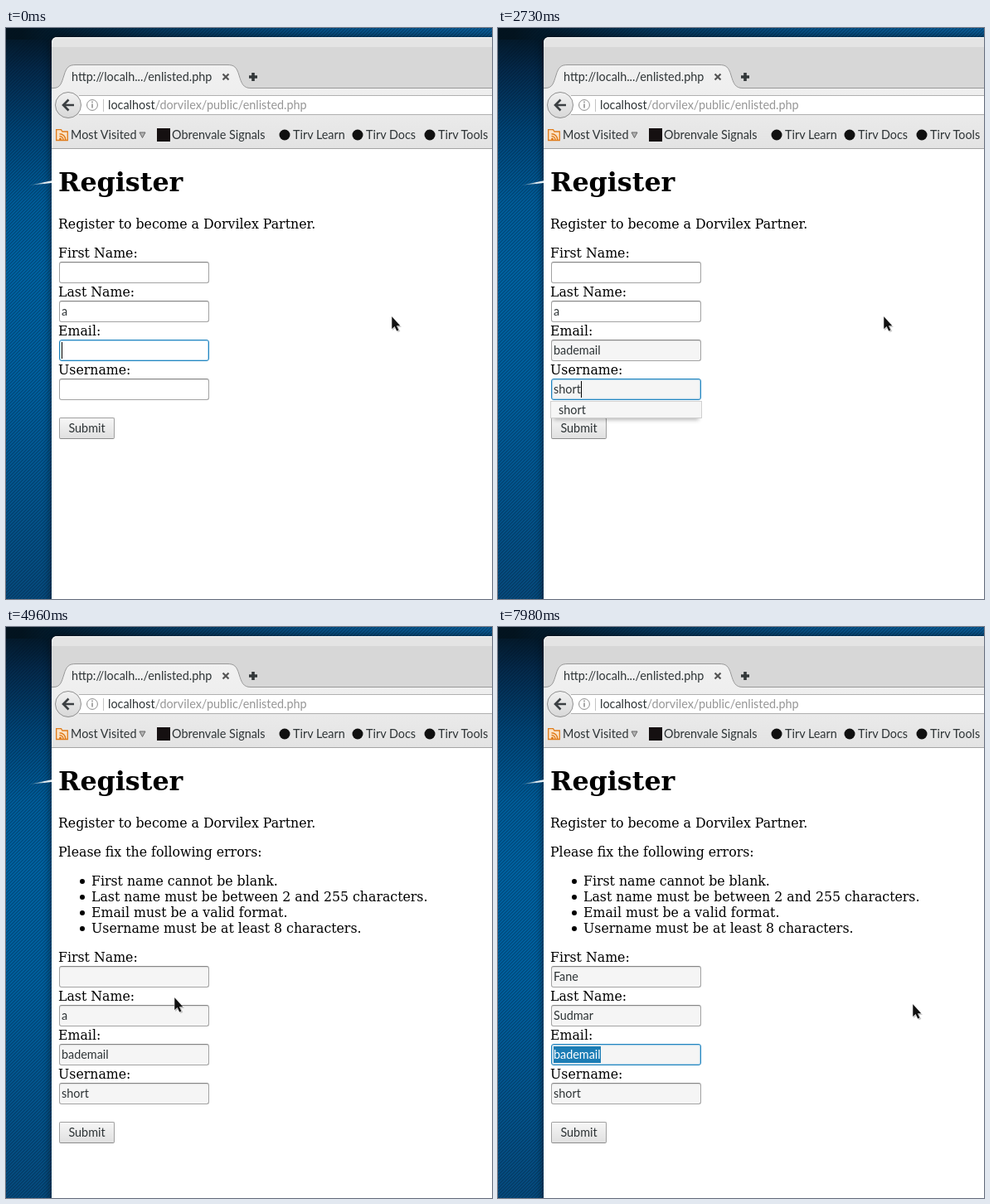
Write an HTML page that moves like this. It is 586 px wide and 689 px high and loops after 8 s.

```html
<!DOCTYPE html>
<html lang="en">
<head>
<meta charset="utf-8">
<title>Register</title>
<style>
  html, body { margin: 0; width: 100%; height: 100%; overflow: hidden; }
  body {
    --weave: repeating-linear-gradient(135deg, rgba(0,12,30,.22) 0 1.4px, transparent 1.4px 2.83px);
    position: relative;
    background: var(--weave),
      linear-gradient(#03141f, #04294a 50px, #004577 125px, #005c98 210px, #0062a1 290px, #005f9d 430px, #03548c 570px, #064a7c 689px);
    font: 15.78px/19px "DejaVu Serif", serif;
    color: #000;
  }
  body > *, #page > *, #form > * { position: absolute; white-space: nowrap; }
  #sky { left: 0; top: 0; width: 586px; height: 14px;
    background: var(--weave), linear-gradient(90deg, #03141f 20px, #063a60 190px, #075389 380px, #0a5c96); }
  #shade { left: 55px; top: 11px; width: 600px; height: 700px; border-radius: 8px 0 0 0; box-shadow: 0 0 9px 1px rgba(0,0,0,.55); }
  #chrome { left: 0; top: 0; }
  #chrome text { font: 14.4px Lato, "Noto Sans", sans-serif; fill: #2e3436; }
  #page { left: 55px; top: 146px; width: 531px; height: 543px; background: #fff; overflow: hidden; }
  h1 { margin: 0; left: 8px; top: 21px; font: bold 31.75px/37px "DejaVu Serif", serif; }
  p { margin: 0; left: 8px; }
  ul { margin: 0; padding: 0; left: 48px; top: 151px; list-style: none; }
  li { position: relative; }
  li::before { content: ""; position: absolute; left: -14px; top: 7px; width: 6px; height: 6px; border-radius: 50%; background: #000; }
  #errors > * { position: absolute; }
  #form { left: 8px; width: 200px; height: 250px; }
  .field, .popup, .submit { box-sizing: border-box; font: 14.4px/20px Lato, "Noto Sans", sans-serif; color: #2e3436; }
  .field { left: 1px; width: 181px; height: 26px; padding: 2px; border: 1px solid #a3a3a3; border-top-color: #858585;
    border-radius: 3px; background: #fff; box-shadow: inset 0 1px 1px rgba(0,0,0,.1); }
  .field.grey { background: #f5f5f5; }
  .field.focus { border-color: #1f84bf; box-shadow: inset 0 0 1px 1px rgba(60,155,212,.4); }
  .field span { display: inline-block; height: 20px; vertical-align: top; }
  .field.picked span { background: #1c7db5; color: #fff; }
  .field i { display: none; width: 1px; height: 20px; margin-right: -1px; background: #000; vertical-align: top; }
  .field.focus i { display: inline-block; }
  .field.picked i { display: none; }
  .popup { left: 0; width: 183px; height: 21px; padding-left: 9px; border: 1px solid #d0d0d0; background: #f6f6f6;
    box-shadow: 0 6px 5px -4px rgba(0,0,0,.28); }
  .submit { left: 1px; top: 208px; width: 67px; height: 26px; border: 1px solid #a0a0a0; border-bottom-color: #8c8c8c;
    border-radius: 2px; background: linear-gradient(#f6f6f6, #e0e0e0); line-height: 24px; text-align: center; }
  #cursor { left: 0; top: 0; overflow: visible; }
</style>
</head>
<body>
<div id="sky"></div>
<div id="shade"></div>

<svg id="chrome" width="586" height="689">
  <defs>
    <linearGradient id="bar" gradientUnits="userSpaceOnUse" x1="0" y1="44" x2="0" y2="145">
      <stop offset="0" stop-color="#f1f1f1"/><stop offset=".4" stop-color="#eeeeee"/><stop offset="1" stop-color="#e3e3e3"/>
    </linearGradient>
    <linearGradient id="knob" x2="0" y2="1"><stop stop-color="#f1f1f1"/><stop offset="1" stop-color="#d8d8d8"/></linearGradient>
    <linearGradient id="ray"><stop stop-color="#8ab" stop-opacity=".15"/><stop offset=".7" stop-color="#e6edf2"/></linearGradient>
  </defs>
  <path d="M27 190L55 184.3V187Z" fill="url(#ray)"/>

  <path d="M55 146V18Q55 11 62 11H586V146Z" fill="#d7d7d7"/>
  <path d="M55 23V18Q55 11 62 11H586V23Z" fill="#e4e4e4"/>
  <path d="M56 18Q56 11.5 62 11.5H586" fill="none" stroke="#f6f6f6"/>
  <path d="M55 72.5H57C66 72.5 67 66 70 57C73 47 76 44.5 84 44.5H267C275 44.5 278 47 281 57C284 67 286 72.5 295 72.5H586V146H55Z" fill="url(#bar)"/>
  <path d="M55 72.5H57C66 72.5 67 66 70 57C73 47 76 44.5 84 44.5H267C275 44.5 278 47 281 57C284 67 286 72.5 295 72.5H586" fill="none" stroke="#989898"/>
  <path d="M55 145.5H586" stroke="#a4a4a4"/>

  <text x="79" y="64">http://localh.../enlisted.php</text>
  <path d="M261.5 55.5l7 7m0-7l-7 7" stroke="#555" stroke-width="2.2"/>
  <path d="M298 54v10m-5-5h10" stroke="#33383a" stroke-width="3.6"/>

  <path d="M88 81.5H586V104.5H88Z" fill="#fff"/>
  <path d="M88 81.5H586M88 104.5H586" stroke="#b0b0b0"/>
  <circle cx="75" cy="93" r="15.5" fill="url(#knob)" stroke="#8f8f8f"/>
  <path d="M82 93H70M75.5 86.5L69 93L75.5 99.5" fill="none" stroke="#3c4043" stroke-width="2.6"/>
  <circle cx="104" cy="93" r="6.4" fill="none" stroke="#8b8b8b"/>
  <path d="M104 91.5v5m0-8v1.8" stroke="#8b8b8b" stroke-width="1.5"/>
  <path d="M117.5 86V101" stroke="#c4c4c4"/>
  <text x="123" y="98">localhost<tspan fill="#969696">/dorvilex/public/enlisted.php</tspan></text>

  <path d="M60.7 135.5V122.7H66.5L68 125H74.3V135.5Z" fill="#fbe3c6" stroke="#e07b1a" stroke-width="1.3"/>
  <circle cx="65.5" cy="134" r="1.5" fill="#e07b1a"/>
  <path d="M64.5 130.5a4.5 4.5 0 0 1 4.5 4.5M64.5 127.7a7.3 7.3 0 0 1 7.3 7.3" fill="none" stroke="#e07b1a" stroke-width="1.4"/>
  <text x="78" y="134">Most Visited</text>
  <path d="M161 126H168L164.5 132.5Z" fill="#b4b4b4" stroke="#666"/>
  <rect x="182" y="121" width="16" height="16" fill="#151011"/>
  <text x="200" y="134">Obrenvale Signals</text>
  <g fill="#111"><circle cx="336" cy="129" r="6.5"/><circle cx="424" cy="129" r="6.5"/><circle cx="511" cy="129" r="6.5"/></g>
  <text x="346" y="134">Tirv Learn</text>
  <text x="434" y="134">Tirv Docs</text>
  <text x="521" y="134">Tirv Tools</text>
</svg>

<div id="page">
  <h1>Register</h1>
  <p style="top:81px">Register to become a Dorvilex Partner.</p>
  <div id="errors" style="left:0;top:0">
    <p style="top:116px">Please fix the following errors:</p>
    <ul>
      <li>First name cannot be blank.</li>
      <li>Last name must be between 2 and 255 characters.</li>
      <li>Email must be a valid format.</li>
      <li>Username must be at least 8 characters.</li>
    </ul>
  </div>
  <div id="form"><div class="submit">Submit</div></div>
</div>

<svg id="cursor" width="1" height="1">
  <g id="arrow">
    <path d="M1 2V17L4.8 14.3L7.4 19.3L10.4 18L8 13H12Z" fill="#000" opacity=".2"/>
    <path d="M.3 .3V15L3.6 12L6.2 17.6L8.4 16.6L5.9 11.2H10.2Z" fill="#111" stroke="#ddd" stroke-width="1" paint-order="stroke"/>
  </g>
  <path id="beam" d="M0 .5H3L4.5 1.5L6 .5H9M4.5 1V16M0 16.5H3L4.5 15.5L6 16.5H9" fill="none" stroke="#111"/>
</svg>

<script>
const LOOP = 8000, STEP = 47;
const SUBMIT = 3190;
const $ = id => document.getElementById(id);
const form = $('form');

const add = (cls, top) => {
  const el = document.createElement('div');
  el.className = cls;
  el.style.top = top + 'px';
  return form.appendChild(el);
};

const fields = ['First Name:', 'Last Name:', 'Email:', 'Username:'].map((name, i) => {
  add('', i * STEP).textContent = name;
  const box = add('field', i * STEP + 20);
  box.innerHTML = '<span></span><i></i>';
  return box;
});
const popup = add('popup', 0);

// key press times for each word
const keys = {
  bademail: [160, 300, 430, 570, 690, 950, 1090, 1240],
  short: [2300, 2460, 2460, 2610, 2730],
  Fane: [6220, 6370, 6490, 6640],
  Sudmar: [7300, 7440, 7570, 7720, 7720, 7860]
};
const typed = (word, t) => word.slice(0, keys[word].filter(k => k <= t).length);

// [time, focused field]
const focusAt = [[0, 2], [1490, 3], [SUBMIT, -1], [5390, 0], [6760, 1], [7980, 2]];

// [time, x, y, text beam?]
const moves = [
  [0, 465, 348], [4170, 440, 305], [4290, 385, 274], [4410, 300, 375], [4530, 249, 435],
  [4680, 222, 435], [4810, 203, 417, 1], [4960, 203, 447], [5110, 193, 416, 1], [5240, 195, 416, 1],
  [5540, 410, 413], [5670, 500, 455]
];
const at = (list, t) => list.filter(s => s[0] <= t).pop();

function draw(t) {
  const failed = t >= SUBMIT;
  const focus = at(focusAt, t)[1];
  const picked = t >= 6760 && t < 7300 || t >= 7980;
  const texts = [typed('Fane', t), typed('Sudmar', t) || 'a', typed('bademail', t), typed('short', t)];
  const grey = [failed, failed, t >= 300, t >= 2460];

  fields.forEach((box, i) => {
    box.firstChild.textContent = texts[i];
    box.classList.toggle('grey', grey[i]);
    box.classList.toggle('focus', i === focus);
    box.classList.toggle('picked', i === focus && picked);
  });

  $('errors').style.display = failed ? '' : 'none';
  form.style.top = (failed ? 243 : 116) + 'px';

  const hint = t >= 300 && t < 1490 ? 2 : t >= 2460 && !failed ? 3 : 0;
  popup.style.display = hint ? '' : 'none';
  popup.style.top = hint * STEP + 47 + 'px';
  popup.textContent = hint === 2 ? 'bademail' : 'short';

  const [, x, y, beam] = at(moves, t);
  $('cursor').style.transform = `translate(${x}px, ${y}px)`;
  $('arrow').style.display = beam ? 'none' : '';
  $('beam').style.display = beam ? '' : 'none';
}

const start = performance.now();
function tick() {
  draw((performance.now() - start) % LOOP);
  requestAnimationFrame(tick);
}
tick();
</script>
</body>
</html>
```
